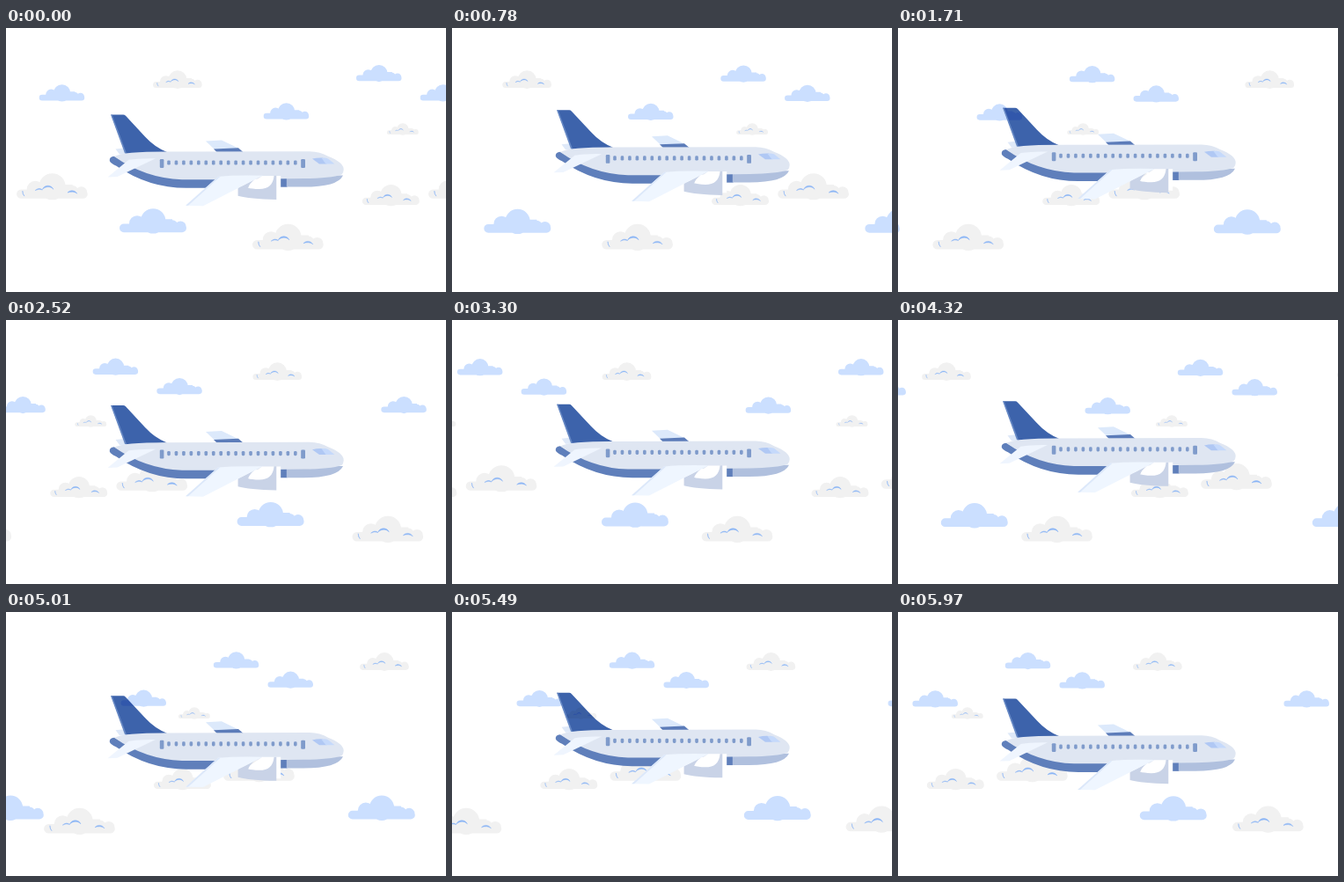
An HTML page with a canvas for the animation above (6000 ms loop, 500x300 px).

```html
<!DOCTYPE html>
<html lang="en">
<head>
<meta charset="utf-8">
<title>Plane in the clouds</title>
<style>
  html, body { margin: 0; width: 100%; height: 100%; overflow: hidden; background: #fff; }
  canvas { display: block; width: 500px; height: 300px; }
</style>
</head>
<body>
<canvas id="stage" width="500" height="300"></canvas>
<script>
const ctx = document.getElementById('stage').getContext('2d');
const LOOP = 6000, STEP = 30;

// Clouds as [x, y, width], repeated at each tile offset [dx, dy].
const blue = {
  color: '#cbdfff', vx: -0.1188, vy: 0.00067,
  tiles: [[0, 0], [433, 0], [855, 0]],
  clouds: [[37.7, 64.2, 51.5], [129, 205.2, 76], [292.7, 85.2, 51.5], [398, 41.9, 51.5]]
};
const white = {
  color: '#f1f1f1', vx: -0.1407, vy: 0, lines: true,
  tiles: [[0, 0], [468, 0], [940, -2.2]],
  clouds: [[167, 48.3, 55.7], [432.8, 108.2, 36], [12, 165.2, 80.7], [404.8, 178, 65], [280, 222.8, 80.7]]
};

const cloudShape = new Path2D();
cloudShape.roundRect(0, 17.2, 76, 9.8, 4.9);
for (const [x, y, r] of [[20, 17, 9], [38.2, 14.2, 14.2], [60, 19.2, 6.2], [69.3, 20.6, 6.4]]) {
  cloudShape.moveTo(x + r, y);
  cloudShape.arc(x, y, r, 0, Math.PI * 2);
}
cloudShape.rect(20, 12, 40, 14);

const cloudLines = new Path2D(
  'M6.4 18.8Q6.2 22 8.4 24.4Q6.6 22.6 6.4 18.8Z' +
  'M20 18.2Q24 14.6 27.6 17.6Q24 16 20 18.2Z' +
  'M27.6 17.2C30 11.6 37.5 12.2 39.4 17C36.6 13.6 31.2 13.6 27.6 17.2Z' +
  'M54.6 20.6C57.5 17.4 62.4 17.8 64.8 21.6C62 19.4 58 19.2 54.6 20.6Z');

function drawCloud(x, y, w, layer) {
  if (x > 500 || x + w < 0) return;
  ctx.save();
  ctx.translate(x, y);
  ctx.scale(w / 76, w / 76);
  ctx.fillStyle = layer.color;
  ctx.fill(cloudShape);
  if (layer.lines) {
    ctx.fillStyle = ctx.strokeStyle = '#8cb6f5';
    ctx.lineWidth = 0.5;
    ctx.fill(cloudLines);
    ctx.stroke(cloudLines);
  }
  ctx.restore();
}

function drawLayer(layer, t) {
  for (const [dx, dy] of layer.tiles)
    for (const [x, y, w] of layer.clouds)
      drawCloud(x + dx + layer.vx * t, y + dy + layer.vy * t, w, layer);
}

function shape(color, d) {
  ctx.fillStyle = color;
  ctx.fill(new Path2D(d));
}

function box(x, y, w, h, r) {
  ctx.beginPath();
  ctx.roundRect(x, y, w, h, r);
  ctx.fill();
}

function drawPlane(dy) {
  ctx.save();
  ctx.translate(0, dy);

  // far wing and far tailplane
  shape('#dce9fb', 'M227 128L245 127L264 136.2L237 137.5Z');
  shape('#5c7cb9', 'M236 137L264 135.8L270 141H240Z');
  shape('#dfe9f8', 'M124.5 137L134 136L137 143H129Z');

  // fin
  ctx.globalCompositeOperation = 'multiply';
  shape('#3d63ab', 'M119.5 98H133Q134.8 98 136 99.4L158 123Q169 135 183 140.5L136 142.5Z');
  ctx.globalCompositeOperation = 'source-over';
  shape('#6688c4', 'M119 98H120.6L137 142H135Z');

  // underside
  shape('#5f7fbb', 'M123 145.4Q117.2 146 117.8 150.5Q119 153.4 125 156Q162 181.4 205 181.4H238V168H190Q150 162 123 145.4Z');
  shape('#5f7fbb', 'M312 168H319.5V180.3H312Z');
  shape('#b0c0de', 'M318.8 167H383Q377 180.2 338 180.2H318.8Z');

  // fuselage
  shape('#dfe6f2', 'M123 145.6Q133 140.2 182 140.2L345 139.8Q357 140 366 145.4Q384 152.5 383.7 160.5Q383.6 164 381.5 166Q369 170.4 338 170.6L237 171.8H200Q158 170.4 123 145.6Z');

  // cockpit
  shape('#b0c8f4', 'M348 148.2Q354 146.8 360 147.2L364.5 154H356Z');
  shape('#c5d9fb', 'M358.5 147.4Q363 146.6 366 148L373.4 154H363.5Z');

  // doors and windows
  ctx.fillStyle = '#7f9bcb';
  box(174.8, 148.6, 4.6, 9.9, 1.2);
  box(335.2, 148.6, 4.8, 9.9, 1.2);
  for (let i = 0; i < 18; i++) box(183.2 + i * 8.46, 150, 3.6, 5.2, 1.4);

  // engine
  shape('#ffffff', 'M272 181L291 167.6H312.2V192H290Z');
  shape('#c9d3e7', 'M263.6 181.5Q268 178.4 276 178.2L274.8 181Q279 182.4 288 182.6C298 182.6 303.6 178 304.6 167.4H307.3V194.6Q276 194 263.6 190.4Z');
  shape('#c9d3e7', 'M264 181.4L283 171.4Q277 176 275 181.4Z');

  // near tailplane and wing
  shape('#eff5fe', 'M115.6 169L139.5 149.4Q152 147.4 170 147.8L126.5 168.6Z');
  shape('#eff6ff', 'M204.2 201.4L241 168.6Q262 166.6 291.5 167.4L224 201.8Z');
  shape('#dce8fa', 'M204.2 201.4L241 168.6L243.5 168.4L207 201.4Z');
  ctx.restore();
}

function draw(t) {
  ctx.fillStyle = '#fff';
  ctx.fillRect(0, 0, 500, 300);
  drawLayer(blue, t);
  drawLayer(white, t);
  drawPlane(-3.4 + 4 * Math.cos(Math.PI * 2 * t / 1200 + 0.31));
}

const start = performance.now();
function tick() {
  const t = (performance.now() - start) % LOOP;
  draw(Math.floor(t / STEP) * STEP);
  requestAnimationFrame(tick);
}
tick();
</script>
</body>
</html>
```
